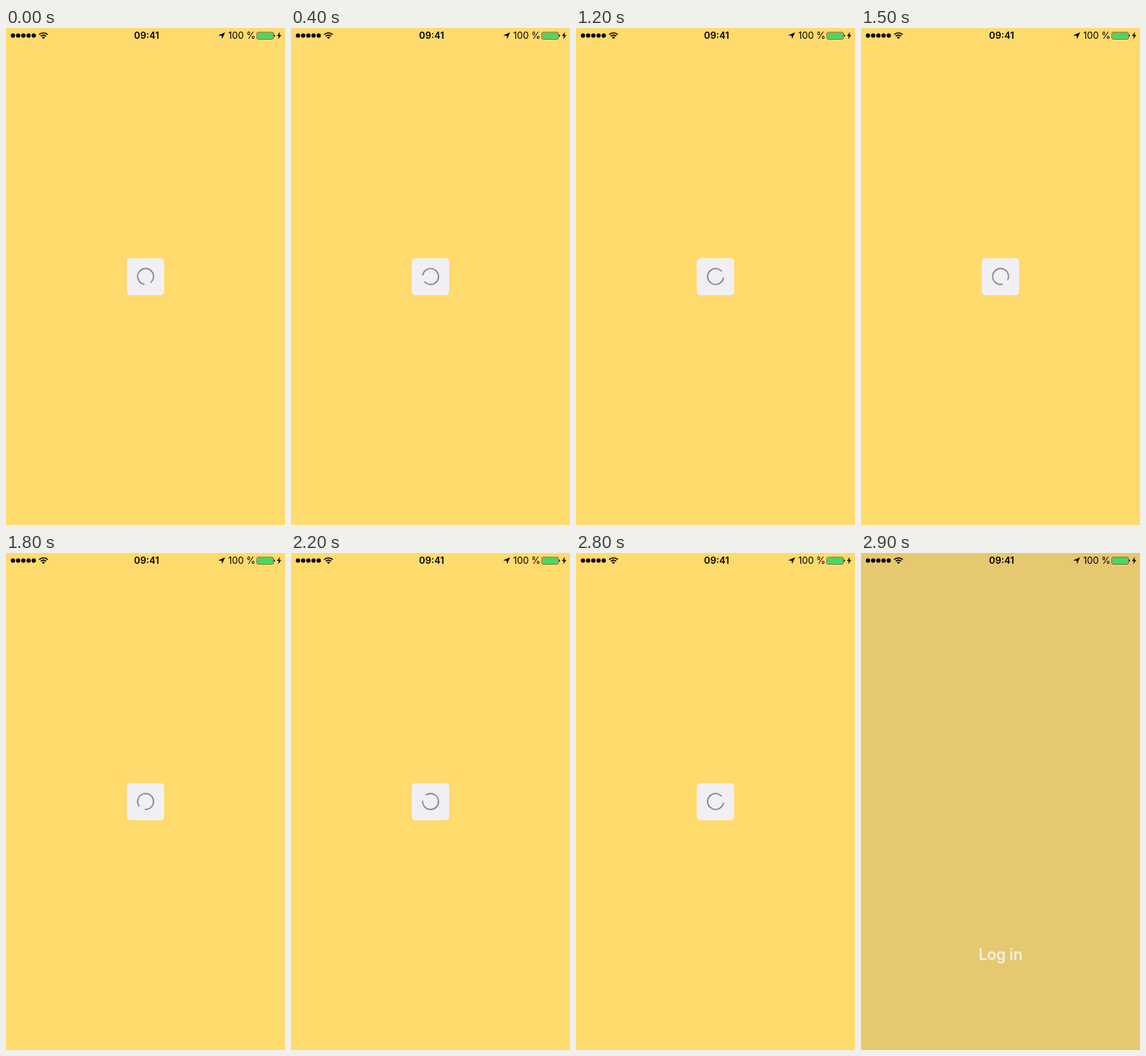
These frames come from a looping animation (388x690 px, 3.1 s). An HTML page:

```html
<!DOCTYPE html>
<html lang="en">
<head>
<meta charset="utf-8">
<title>Log in</title>
<style>
  :root { --loop: 3100ms -1ms infinite; }
  html, body { margin: 0; width: 100%; height: 100%; overflow: hidden; background: #ffda6d; }
  svg { display: block; width: 388px; height: 690px; font-family: Inter, sans-serif; }

  .bg { fill: #ffda6d; animation: dim var(--loop) step-end; }
  .hud { animation: hide var(--loop) step-end; }
  .login { opacity: 0; animation: show var(--loop) step-end; }
  .ring { transform-origin: 194.1px 345px; animation: spin var(--loop) steps(31, end); }

  .clock { font-size: 13px; font-weight: 600; }
  .charge { font-size: 13px; }
  .login { font-size: 21.5px; font-weight: 600; letter-spacing: -.3px; }

  /* 2900 ms of 3100 ms */
  @keyframes dim { 93.5484% { fill: #e6c870; } 100% { fill: #e6c870; } }
  @keyframes hide { 0% { opacity: 1; } 93.5484%, 100% { opacity: 0; } }
  @keyframes show { 0% { opacity: 0; } 93.5484%, 100% { opacity: 1; } }
  /* one turn per 1600 ms */
  @keyframes spin { from { transform: rotate(98deg); } to { transform: rotate(795.5deg); } }
</style>
</head>
<body>
<svg viewBox="0 0 388 690" text-anchor="middle">
  <rect class="bg" width="388" height="690"/>

  <g class="status">
    <path d="M9.7 10.6h28.9" fill="none" stroke="#000" stroke-width="6" stroke-linecap="round" stroke-dasharray="0 7.22"/>
    <g fill="none" stroke="#000" stroke-width="1.7">
      <path d="M46.2 9.2a8.3 8.3 0 0 1 11.8 0"/>
      <path d="M48.4 11.5a5.2 5.2 0 0 1 7.4 0"/>
    </g>
    <path d="M52.1 15.3l-2.1-2.2a3 3 0 0 1 4.2 0z"/>
    <text class="clock" x="195.5" y="15.2">09:41</text>
    <path d="M304.7 6l-4.2 9.2-.6-4.4-4.9-.6z"/>
    <text class="charge" x="328" y="15.2">100 %</text>
    <rect x="348.9" y="6" width="23" height="9.4" rx="1.8" fill="none" stroke="#2b3320" stroke-width=".8"/>
    <rect x="349.8" y="6.9" width="21.2" height="7.6" rx="1" fill="#43d962"/>
    <path d="M372.7 9v3.4q1.4-.4 1.4-1.7t-1.4-1.7z"/>
    <path d="M381 5.6l-4.2 5.5h2.6l-1 4.4 4.5-5.8h-2.7z"/>
  </g>

  <g class="hud">
    <rect x="168" y="319.5" width="52" height="51.5" rx="5" fill="#f2eff4"/>
    <circle class="ring" cx="194.1" cy="345" r="11.1" fill="none" stroke="#69676c" stroke-width="1.4" pathLength="360" stroke-dasharray="312 48"/>
  </g>

  <text class="login" x="194" y="565" fill="#f3eee6">Log in</text>
</svg>
</body>
</html>
```
